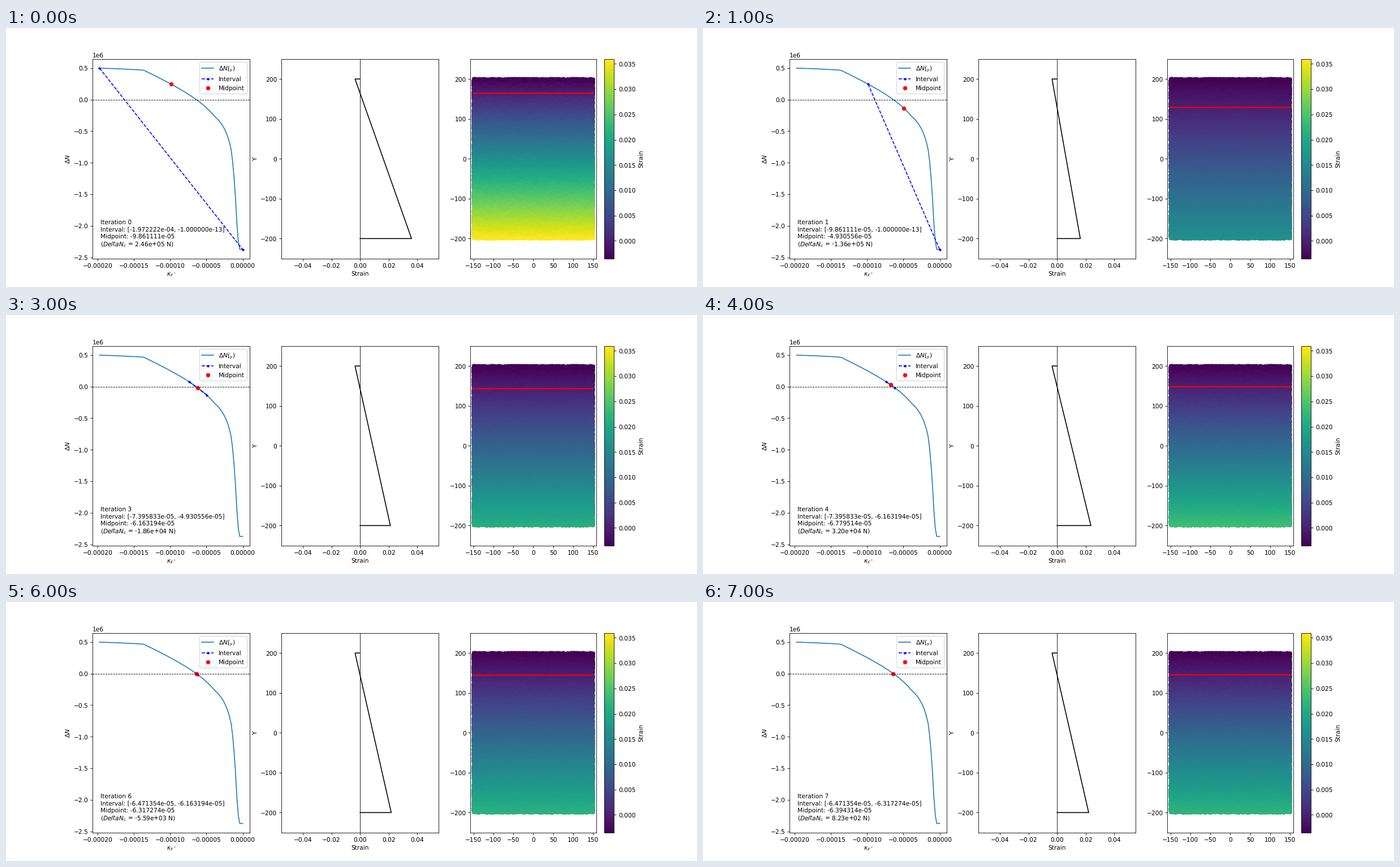
Animation of 1222x458 px, one loop 8 s. Source, as a matplotlib script:

```python
import numpy as np
import matplotlib.pyplot as plt
from matplotlib.animation import FuncAnimation

DPI = 76.375
STEPS = 8
K_MIN, K_MAX = -71 / 3.6e5, -1e-13

# Section in mm, stresses in MPa, forces in N
HALF_W, HALF_H = 150, 200
COVER = 40
STEEL_AREA, STEEL_E, STEEL_Y = 601.26, 2e5, 450 / 1.15
CONCRETE = 16.7083
EPS_C2, TOP_STRAIN = 0.002, -0.0035
LOAD = 100962

plt.rcParams["text.hinting"] = "none"


def strain(k, y):
    return TOP_STRAIN - k * (HALF_H - y)


def steel_force(k, y):
    return STEEL_AREA * np.clip(STEEL_E * strain(k, y), -STEEL_Y, STEEL_Y)


def stress_area(eps):
    """Integral of the parabola-rectangle law from zero to eps."""
    e = np.clip(eps, 0, EPS_C2)
    flat = np.maximum(eps - EPS_C2, 0)
    return CONCRETE * (e**2 / EPS_C2 - e**3 / (3 * EPS_C2**2) + flat)


def imbalance(k):
    """Axial force imbalance of the section for curvature k."""
    concrete = 2 * HALF_W * (stress_area(-strain(k, HALF_H))
                             - stress_area(-strain(k, -HALF_H))) / -k
    bars = steel_force(k, HALF_H - COVER) + steel_force(k, COVER - HALF_H)
    return LOAD + bars - concrete


def bisect(count):
    a, b = K_MIN, K_MAX
    steps = []
    for _ in range(count):
        mid = (a + b) / 2
        steps.append((a, b, mid))
        if imbalance(mid) > 0:
            a = mid
        else:
            b = mid
    return steps


def fibres(nx=60, ny=84, jitter=1.3):
    """Jittered points filling the section in random order."""
    rng = np.random.default_rng(4)
    gx, gy = np.meshgrid(np.linspace(-HALF_W, HALF_W, nx),
                         np.linspace(-HALF_H, HALF_H, ny))
    x = gx.ravel() + rng.uniform(-jitter, jitter, gx.size)
    y = gy.ravel() + rng.uniform(-jitter, jitter, gy.size)
    order = rng.permutation(x.size)
    return (np.clip(x, -HALF_W, HALF_W)[order],
            np.clip(y, -HALF_H, HALF_H)[order])


steps = bisect(STEPS)
fx, fy = fibres()
first = steps[0][2]

fig, (ax_n, ax_e, ax_s) = plt.subplots(1, 3, figsize=(1222 / DPI, 458 / DPI), dpi=DPI)
fig.subplots_adjust(right=0.8998)

# Root search
ks = np.linspace(K_MIN, K_MAX, 100)
ends = np.array([K_MIN, K_MAX])
ax_n.plot(ks, imbalance(ks), label="$\\Delta N(\u0328_y)$")
interval, = ax_n.plot(ends, imbalance(ends), "b.--", label="Interval")
midpoint, = ax_n.plot([first], [imbalance(first)], "ro", label="Midpoint")
ax_n.axhline(0, color="black", ls="--", lw=0.8)
ax_n.set_xlabel(r"$\kappa_{y^*}$")
ax_n.set_ylabel(r"$\Delta N$")
ax_n.legend(loc="upper right")
note = ax_n.text(0.05, 0.05, "", transform=ax_n.transAxes, va="bottom")

# Strain profile
ax_e.axvline(0, color="black", lw=0.8)
profile, = ax_e.plot([], [], color="black")
ax_e.set_xlim(-0.055, 0.055)
ax_e.set_ylim(-250, 250)
ax_e.set_xlabel("Strain")
ax_e.set_ylabel("Y")

# Section coloured by strain
cloud = ax_s.scatter(fx, fy, c=strain(first, fy), cmap="viridis",
                     vmin=TOP_STRAIN, vmax=strain(first, -HALF_H))
neutral, = ax_s.plot([], [], color="red", lw=2, snap=False)
ax_s.set_xlim(-157.95, 157.95)
ax_s.set_ylim(-250, 250)
ax_s.set_xticks(range(-150, 151, 50))
fig.colorbar(cloud, ax=ax_s, label="Strain")


def update(i):
    a, b, mid = steps[i]
    n_mid = imbalance(mid)
    interval.set_data([a, b], [imbalance(a), imbalance(b)])
    midpoint.set_data([mid], [n_mid])
    note.set_text(f"Iteration {i}\n"
                  f"Interval: [{a:.6e}, {b:.6e}]\n"
                  f"Midpoint: {mid:.6e}\n"
                  f"($DeltaN_c$ = {n_mid:.2e} N)")
    profile.set_data([0, TOP_STRAIN, strain(mid, -HALF_H), 0],
                     [HALF_H, HALF_H, -HALF_H, -HALF_H])
    cloud.set_array(strain(mid, fy))
    level = HALF_H - TOP_STRAIN / mid
    neutral.set_data([-HALF_W, HALF_W], [level, level])
    return interval, midpoint, note, profile, cloud, neutral


anim = FuncAnimation(fig, update, frames=STEPS, interval=1000, repeat=True, repeat_delay=0)
plt.show()
```
